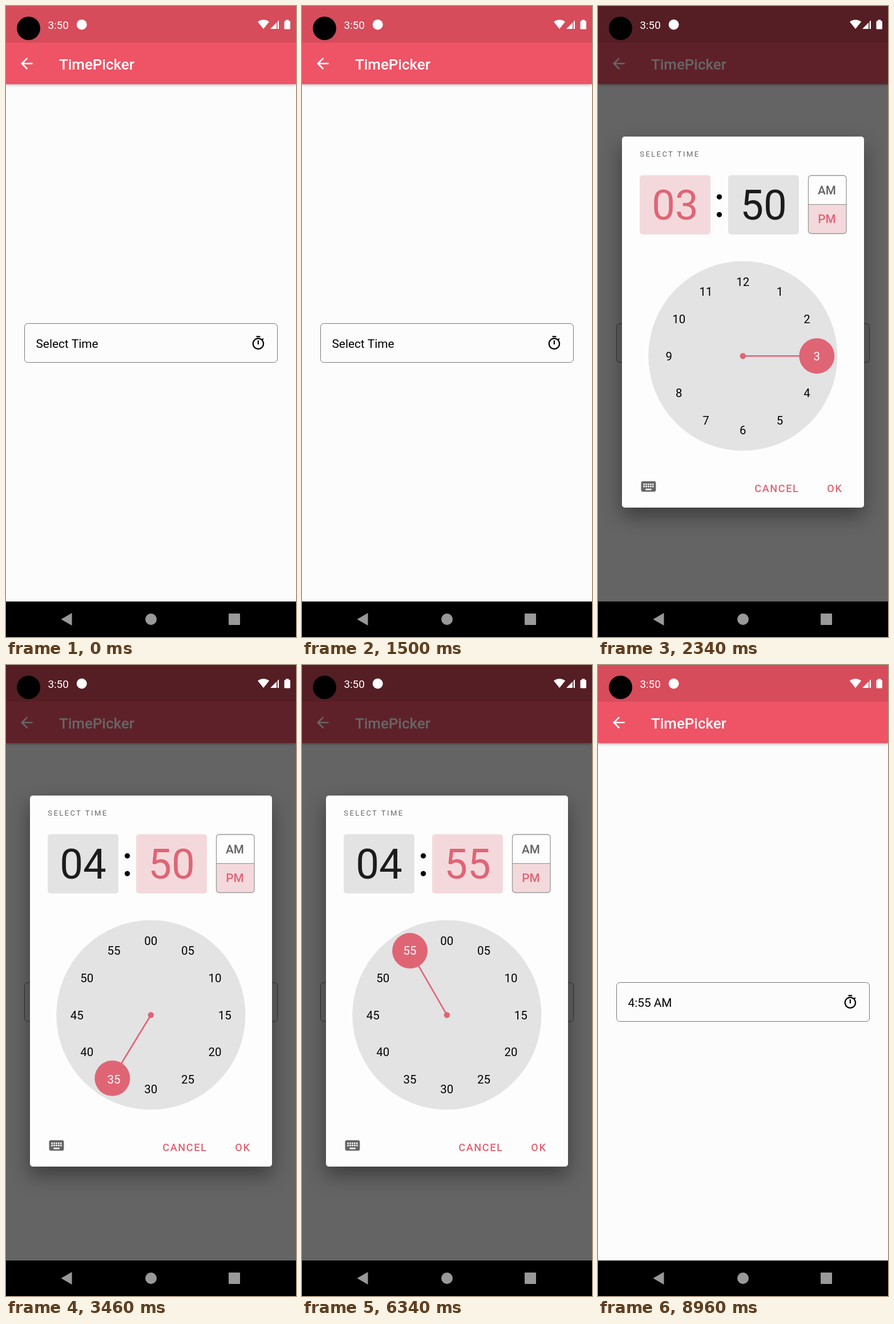
An HTML page with a canvas for the animation above (9220 ms loop, 508x1102 px).

```html
<!DOCTYPE html>
<html lang="en">
<head>
<meta charset="utf-8">
<title>TimePicker</title>
<style>
  html, body { margin: 0; width: 100%; height: 100%; overflow: hidden; background: #000; }
  canvas { display: block; width: 508px; height: 1102px; }
</style>
</head>
<body>
<canvas id="stage" width="508" height="1102"></canvas>
<script>
const W = 508, H = 1102, LOOP = 9220;
const DP = 1.295;
const PINK = '#df6575', PINK_SOFT = '#f4d9dc', PAPER = '#fdfdfd', GREY = '#e3e3e4';

// Moments of the interaction, in ms
const T = {
  press: 1990, open: 2076, dim: 2086, layout: 2170, hour: 3290, minutes: 3360,
  fiftyFive: 5600, am: 6700, ok: 7755, close: 7820, closed: 7960
};

const page = document.getElementById('stage').getContext('2d');
const layer = document.createElement('canvas');
layer.width = W;
layer.height = H;
const sheet = layer.getContext('2d');

const ICON = {
  back: new Path2D('M20 11H7.83l5.59-5.59L12 4l-8 8 8 8 1.41-1.41L7.83 13H20v-2z'),
  timer: new Path2D('M15 1H9v2h6V1zm-4 13h2V8h-2v6zm8.03-6.61l1.42-1.42c-.43-.51-.9-.99-1.41-1.41l-1.42 1.42C16.07 4.74 14.12 4 12 4c-4.97 0-9 4.03-9 9s4.02 9 9 9 9-4.03 9-9c0-2.12-.74-4.07-1.97-5.61zM12 20c-3.87 0-7-3.13-7-7s3.13-7 7-7 7 3.13 7 7-3.13 7-7 7z'),
  keyboard: new Path2D('M20 5H4c-1.1 0-2 .9-2 2v10c0 1.1.9 2 2 2h16c1.1 0 2-.9 2-2V7c0-1.1-.9-2-2-2zm-9 3h2v2h-2V8zm0 3h2v2h-2v-2zM8 8h2v2H8V8zm0 3h2v2H8v-2zm-1 2H5v-2h2v2zm0-3H5V8h2v2zm9 7H8v-2h8v2zm0-4h-2v-2h2v2zm0-3h-2V8h2v2zm3 3h-2v-2h2v2zm0-3h-2V8h2v2z')
};

const ramp = (t, from, to) => Math.min(1, Math.max(0, (t - from) / (to - from)));
const ease = p => (1 - Math.cos(Math.PI * p)) / 2;

function text(c, str, x, y, size, color, { weight = 400, align = 'left', spacing = 0 } = {}) {
  c.font = `${weight} ${size}px Roboto, sans-serif`;
  c.letterSpacing = spacing + 'px';
  c.textAlign = align;
  c.fillStyle = color;
  c.fillText(str, x, y);
}

function disc(c, x, y, r, color) {
  c.fillStyle = color;
  c.beginPath();
  c.arc(x, y, r, 0, 2 * Math.PI);
  c.fill();
}

function box(c, x, y, w, h, r, fill, stroke, line = 1) {
  c.beginPath();
  c.roundRect(x, y, w, h, r);
  if (fill) { c.fillStyle = fill; c.fill(); }
  if (stroke) { c.strokeStyle = stroke; c.lineWidth = line; c.stroke(); }
}

function poly(c, color, ...points) {
  c.fillStyle = color;
  c.beginPath();
  for (const [x, y] of points) c.lineTo(x, y);
  c.fill();
}

function icon(c, path, x, y, scale, color) {
  c.save();
  c.translate(x, y);
  c.scale(scale, scale);
  c.fillStyle = color;
  c.fill(path);
  c.restore();
}

function drawScreen(c, t) {
  c.fillStyle = '#fcfcfc';
  c.fillRect(0, 0, W, H);

  c.save();
  c.shadowColor = 'rgba(0,0,0,.28)';
  c.shadowBlur = 5;
  c.shadowOffsetY = 1;
  c.fillStyle = '#ee5366';
  c.fillRect(0, 64, W, 72.5);
  c.restore();
  c.fillStyle = '#d64c5b';
  c.fillRect(0, 0, W, 64);
  icon(c, ICON.back, 20.8, 85, DP, '#fff');
  text(c, 'TimePicker', 93, 110.5, 25.9, '#fff', { weight: 500 });

  const pressed = 0.18 * ramp(t, T.press, T.press + 110) * (1 - ramp(t, 2140, 2400));
  box(c, 32.5, 554.5, 443, 68, 6, `rgba(0,0,0,${pressed})`, '#777');
  text(c, t < T.close ? 'Select Time' : '4:55 AM', 52.5, 597, 20.8, '#000');
  icon(c, ICON.timer, 428.2, 575, 1.14, '#000');
}

function drawSystemBars(c) {
  disc(c, 39.5, 39, 20.5, '#000');
  text(c, '3:50', 73.5, 39.5, 18.8, '#fff');
  disc(c, 132.7, 32.5, 9, '#fff');

  c.fillStyle = '#fff';
  c.beginPath();
  c.moveTo(451, 40);
  c.arc(451, 40, 16, -2.25, -0.89);
  c.fill();
  poly(c, '#fff', [463, 40], [474, 29], [474, 40]);
  poly(c, '#fff', [475.6, 27.5], [478, 25], [478, 40], [475.6, 40]);
  box(c, 487.5, 26, 10.5, 14.5, 1.5, '#fff');
  c.fillRect(490.3, 24, 5, 3);

  c.fillStyle = '#000';
  c.fillRect(0, 1040, W, 62);
  poly(c, '#999', [96.5, 1071], [115.5, 1060], [115.5, 1082]);
  disc(c, 254, 1071, 10, '#999');
  box(c, 390, 1061, 20, 20, 1, '#999');
}

function drawChip(c, x, value, active) {
  box(c, x, 295.5, 124, 103.5, 5, active ? PINK_SOFT : GREY);
  text(c, value, x + 62, 373, 72.5, active ? PINK : '#1c1c1c', { align: 'center' });
}

function drawPeriod(c, am) {
  c.save();
  c.beginPath();
  c.roundRect(368.5, 296, 66.5, 101.5, 5);
  c.clip();
  c.fillStyle = PINK_SOFT;
  c.fillRect(368, am ? 295 : 346.5, 68, 51.5);
  c.restore();
  box(c, 368.5, 296, 66.5, 101.5, 5, null, '#999', 1.3);
  c.fillStyle = '#999';
  c.fillRect(368.5, 346, 66.5, 1.2);
  const style = { weight: 500, align: 'center' };
  text(c, 'AM', 401, 329.2, 20.7, am ? PINK : '#646464', style);
  text(c, 'PM', 401, 379.4, 20.7, am ? '#646464' : PINK, style);
}

function handAngle(t) {
  if (t < T.hour) return 90;
  if (t < T.minutes) return 120;
  return 120 + 180 * ease(ramp(t, T.minutes, T.minutes + 200))
             + 30 * ease(ramp(t, T.fiftyFive, T.fiftyFive + 150));
}

function drawDial(c, t) {
  const cx = 253.8, cy = 611.2, reach = 129.5, knob = 31;
  const place = (deg, r) => {
    const a = deg * Math.PI / 180;
    return [cx + r * Math.sin(a), cy - r * Math.cos(a)];
  };
  const labels = (color, spread) => {
    for (let i = 0; i < 12; i++) {
      const label = t < T.minutes ? String(i || 12) : String(i * 5).padStart(2, '0');
      const [x, y] = place(i * 30, spread);
      text(c, label, x, y + 7.3, 20.4, color, { align: 'center' });
    }
  };

  disc(c, cx, cy, 165.6, GREY);
  const ready = t >= T.layout;
  if (ready) labels('#000', reach);

  const [x, y] = place(handAngle(t), reach);
  c.strokeStyle = PINK;
  c.lineWidth = 2.6;
  c.beginPath();
  c.moveTo(cx, cy);
  c.lineTo(x, y);
  c.stroke();
  disc(c, cx, cy, 5.2, PINK);
  disc(c, x, y, knob, PINK);

  // Before the first layout pass the numerals sit stacked at the centre
  if (!ready) return labels('#fff', 0);
  c.save();
  c.beginPath();
  c.arc(x, y, knob, 0, 2 * Math.PI);
  c.clip();
  labels('#fff', reach);
  c.restore();
}

function drawDialog(c, t) {
  c.clearRect(0, 0, W, H);
  c.save();
  c.shadowColor = 'rgba(0,0,0,.4)';
  c.shadowBlur = 34;
  c.shadowOffsetY = 15;
  box(c, 42, 228, 424, 648, 5, PAPER);
  c.restore();

  text(c, 'SELECT TIME', 73.3, 263, 13, '#666', { spacing: 2.4 });
  const minutes = t >= T.minutes;
  drawChip(c, 73, t < T.hour ? '03' : '04', !minutes);
  drawChip(c, 228, t < T.fiftyFive ? '50' : '55', minutes);
  disc(c, 212.5, 333.3, 4.6, '#000');
  disc(c, 212.5, 364.3, 4.6, '#000');
  drawPeriod(c, t >= T.am);
  drawDial(c, t);

  icon(c, ICON.keyboard, 72.9, 823.6, DP, '#666');
  const ripple = ramp(t, T.ok, T.ok + 110);
  if (ripple) box(c, 391, 818.5, 52, 47.5, 17, `rgba(223,101,117,${0.14 * ripple})`);
  const style = { weight: 500, spacing: 1.6 };
  text(c, 'CANCEL', 274.3, 849.3, 18.1, PINK, style);
  text(c, 'OK', 401.3, 849.3, 18.1, PINK, style);
}

function draw(t) {
  drawScreen(page, t);
  const leaving = ramp(t, T.close, T.closed);
  const scrim = 0.6 * ramp(t, T.dim, T.dim + 200) * (1 - leaving);
  page.fillStyle = `rgba(0,0,0,${scrim})`;
  page.fillRect(0, 0, W, 1040);

  const opacity = ramp(t, T.open, T.open + 150) * (1 - leaving);
  if (opacity) {
    drawDialog(sheet, t);
    page.globalAlpha = opacity;
    page.drawImage(layer, 0, 0);
    page.globalAlpha = 1;
  }
  drawSystemBars(page);
}

const start = performance.now();
function tick() {
  draw((performance.now() - start) % LOOP);
  requestAnimationFrame(tick);
}
tick();
</script>
</body>
</html>
```
